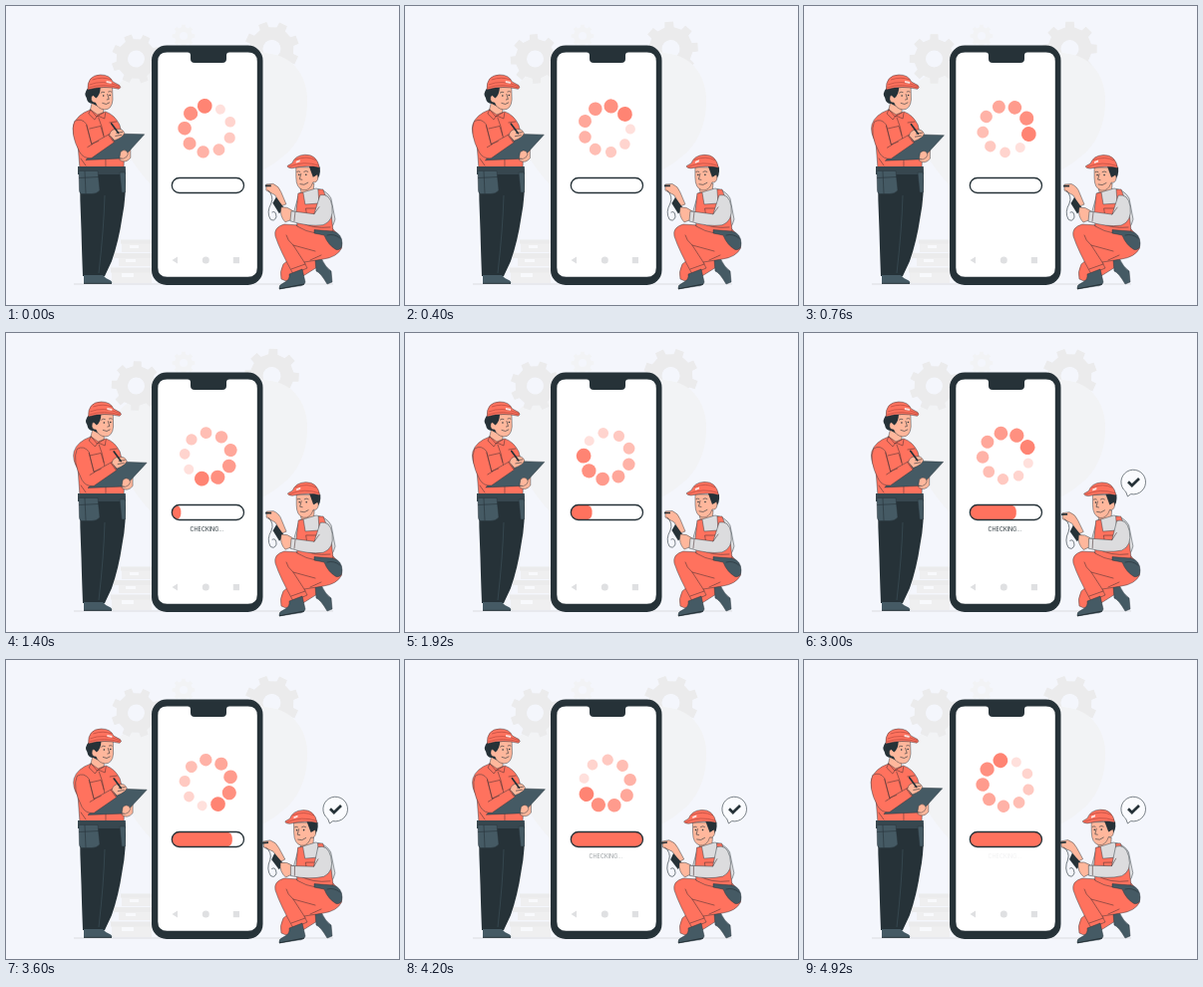
An HTML page for the animation above (4.96 s loop, 394 by 300 pixels).

```html
<!DOCTYPE html>
<html lang="en">
<head>
<meta charset="utf-8">
<title>Checking</title>
<style>
  html, body { margin: 0; width: 100%; height: 100%; overflow: hidden; background: #f4f6fc; }
  svg { display: block; width: 100%; height: 100%; }
  .coral { fill: #ff725e; }
  .dark { fill: #263238; }
  .slate { fill: #455a64; }
  .skin { fill: #ffb79c; }
  .shirt { fill: #dcdcde; }
  .pale { fill: #ebebec; }
  .blob { fill: #f2f3f5; }
  .edge { stroke: #263238; stroke-width: .45; stroke-linejoin: round; }
  .line { fill: none; stroke: #263238; stroke-width: .6; stroke-linecap: round; stroke-linejoin: round; }
  .fold { fill: none; stroke: #4a3334; stroke-width: .55; stroke-linecap: round; }
  .stripe { fill: none; stroke: #a9443a; stroke-width: .6; }
</style>
</head>
<body>
<svg viewBox="0 0 394 300">
  <rect width="394" height="300" fill="#f4f6fc"/>

  <g id="back">
    <path id="gearR" class="pale"/>
    <path id="gearS" class="blob" fill-rule="evenodd"/>
    <path class="blob" d="M105 98C105 76 130 66 150 52C180 38 240 42 265 48C290 51 304 74 302 99C301 124 290 143 275 153C250 175 190 190 150 184C128 162 106 128 105 98Z"/>
    <path id="gearL" class="pale" fill-rule="evenodd"/>
    <g fill="#efeff0">
      <rect x="116" y="235" width="30" height="12"/>
      <rect x="113" y="249" width="33" height="12"/>
      <rect x="106" y="264" width="40" height="14"/>
    </g>
    <path class="pale" d="M115 234.500h31v4h-31zM108 248h38v5h-38zM105 262.500h41v5h-41z"/>
    <path fill="#f8f9fc" d="M124 240h9v3h-9zM120 254h10v3h-10zM116 268h12v4h-12z"/>
    <path d="M68 279H328" stroke="#d0d2d5" stroke-width=".7"/>
  </g>

  <g id="phone">
    <rect class="dark" x="146" y="39.500" width="111.500" height="240.500" rx="15"/>
    <path fill="#fff" d="M161.500 46.500H182Q185 46.500 185 49.500V53Q185 57 189 57H217Q221 57 221 53V49.500Q221 46.500 224 46.500H242.500Q251.800 46.500 251.800 55.500V262.500Q251.800 271.800 242.500 271.800H161.500Q152.300 271.800 152.300 262.500V55.500Q152.300 46.500 161.500 46.500Z"/>
    <g fill="#dfe0e2">
      <path d="M166.500 255L172 251.500V258.500Z"/>
      <circle cx="200.300" cy="255" r="3.500"/>
      <rect x="227.800" y="252" width="6.200" height="6.200"/>
    </g>
    <g id="ring"></g>
    <clipPath id="barClip"><rect x="166.300" y="172.500" width="72.200" height="15" rx="7.500"/></clipPath>
    <g clip-path="url(#barClip)"><rect id="fill" class="coral" x="166" y="172.500" width="72.500" height="15" rx="6"/></g>
    <rect x="166.300" y="172.500" width="72.200" height="15" rx="7.500" fill="none" stroke="#263238" stroke-width="1.300"/>
    <text id="label" x="201.300" y="199" text-anchor="middle" font-family="Inter, sans-serif" font-size="5.500" fill="#263238">CHECKING...</text>
  </g>

  <g id="standing">
    <path class="dark" d="M74 163H119.500Q121 190 116.500 212Q113 236 106 256L99 271H77Q76 245 75.500 225Q74 195 74 163Z"/>
    <path fill="none" stroke="#455a64" stroke-width=".5" d="M99 190Q98 225 93 268"/>
    <path class="slate" d="M78 270H97Q100 274 105 275.500Q107 277 106 278.500H78Z"/>
    <path d="M78 278.300H106" stroke="#263238" stroke-width="1"/>
    <g id="torso">
      <path class="skin edge" d="M87 95L98 99V109L91 111L84 107Z"/>
      <path class="coral edge" d="M85 104L92 109L100 106Q109 109 114 119L119 139L118 163H74L72 137Q66 127 68 119Q71 109 85 104Z"/>
      <path class="fold" d="M85 104L91 111L98 107M85 104L83 108L89 114L92 110L99 113L100 107M93 112Q101 130 100 161M84 123L95 120.500L98 130M104 117L111 116M75 153L80 160"/>
      <path class="dark" d="M72 161H119.800V169H72Z" style="fill:#37474f"/>
      <g id="head">
        <path class="dark" d="M82 83Q78 88 81 92Q82 98 87 98L93 101L92 82Z"/>
        <path class="skin edge" d="M90 82L107 81L107.300 94Q106.500 104 99 104Q92 103 90 97Q85 97 86 91Q88 88 90 91Z"/>
        <path class="dark" d="M86 82H95Q95 89 90.500 92.500L87 89Z"/>
        <path class="line" d="M95.500 87Q97 85.500 99 86.500M103 86Q105 85 106 86M102 88.500L103.500 93.500L101.500 94M97 97.500Q101 100 104 97"/>
        <circle class="dark" cx="98" cy="90" r=".8"/><circle class="dark" cx="104.500" cy="89.500" r=".8"/>
        <path class="coral edge" d="M82.300 84Q81.500 69.500 95 69Q104.500 69 107.500 76L114 79.500Q116.500 82 113.500 83.300Q98 79.500 82.300 84Z"/>
        <path class="stripe" d="M84 79Q97 73.500 114 80.500M87 74Q97 70.500 106 74M83 82Q98 77 114 82"/>
        <path fill="#fff" opacity=".8" d="M101 75L106 76V78L101 77Z"/>
      </g>
      <g id="arms">
        <path class="skin edge" d="M116 144Q122 138 126 143L126 153Q121 159 115 155Z"/>
        <path class="slate edge" d="M109 128.500L140 129.500L118 153.500L81 155Z"/>
        <path class="skin edge" d="M116 147Q119 144 122 146Q125 149 122 152Q119 155 115 153Z"/>
        <path class="coral edge" d="M70 116Q77 112 82 119L87 139L105 129L110 137L87 153Q79 154 75 147Q65 128 70 116Z"/>
        <path class="fold" d="M82 120L87 139L94 136M83 142L88 139M104 130L109 137"/>
        <path class="skin edge" d="M105 130Q106 124 112 124Q118 123 120 128Q119 132 110 135.500Z"/>
        <path d="M107 118.500L114 128" stroke="#263238" stroke-width="1.700" stroke-linecap="round"/>
        <path class="line" d="M112 128L118 127M111 131L117 130"/>
      </g>
    </g>
    <path class="slate edge" d="M73 165.500H92L94 185Q91 188.500 86 188.500H76Q73.500 188 73.500 185Z"/>
    <path class="line" d="M73.500 172.500L93 171.500M79 166L80 188"/>
    <path class="slate edge" d="M114 167H119.500V187H116Z"/>
  </g>

  <g id="kneeling">
    <path class="coral edge" d="M289 250L278 259Q274 267 276 274Q283 278 293 274L312 262L314 252Z"/>
    <path class="slate edge" d="M310 255L316 253Q320 262 326 266L327 277L322 279Q315 267 311 266Z"/>
    <path class="coral edge" d="M279 219L326 222Q337 232 336.500 243Q332 252 318 254L299 257L302 263L288 269Q275 246 270 231Q268 222 279 219Z"/>
    <path class="fold" d="M299 257L288 240Q282 235 281 230M288 240L310 246M286 264L300 259M291 220Q302 226 316 226M305 255L316 250"/>
    <path class="slate edge" d="M284 269L297 264L300 277Q299 281 293 281L274 284Q273 280 278 278Q285 275 284 269Z"/>
    <path d="M274 283.800L299 279" stroke="#263238" stroke-width="1"/>
    <g id="lean">
      <path class="skin edge" d="M294 176L309 178L308 190L297 192Z"/>
      <path class="shirt edge" d="M294 188L311 183Q322 185 326 193L330 214Q328 226 315 225L297 221L288 209Z"/>
      <path class="coral edge" d="M293 188L298 187L300 199L314 198L313 184L318 184Q321 194 325 199L328 226Q310 232 292 221L291 207Z"/>
      <path class="fold" d="M301 203H312V210H302ZM294 216Q307 224 325 222"/>
      <g id="face">
        <path class="dark" d="M307 160L315 162Q316 171 311 175L305 171Z"/>
        <path class="skin edge" d="M291 162L308 162L309 171Q313 167 313 173Q312 178 308 177Q305 186 298 185Q291 183 291 172Z"/>
        <path class="dark" d="M304 161L313 161L311.500 170L308 172Z"/>
        <path class="line" d="M292 166.500Q294 165.500 295 166.500M299 166.500Q301 165 303 166.500M296 168.500L294.500 174L297 174.500M295 179Q299 181 303 177.500"/>
        <circle class="dark" cx="294" cy="169.500" r=".8"/><circle class="dark" cx="301" cy="169.500" r=".8"/>
        <path class="coral edge" d="M287 158Q290 150 300 149.500Q312 149 314.500 162.500Q303 159.500 287 163Q281.500 162.500 282.500 160.500Z"/>
        <path class="stripe" d="M284 161.500Q299 155 314 160.500M290 154.500Q302 150 311 155"/>
        <path fill="#fff" opacity=".8" d="M291 156L295 154.500V156.500L291 158Z"/>
      </g>
      <g id="reach">
        <path class="skin edge" d="M261 179L268 178.500Q274 181 276 187L281 199L276 201L270 190L261 185Z"/>
        <path d="M260 180.500L266 180.500" stroke="#263238" stroke-width="1.700"/>
        <path class="line" d="M263 185Q269 191 266 198Q261 207 265 214Q269 217 271 212Q271 205 267 207"/>
        <path class="dark" d="M271 192L279 203L274 208.500L267.500 198Z"/>
        <path class="skin edge" d="M276 202Q282 201 288 206L288 214L280 217Q274 211 276 202Z"/>
        <path class="shirt edge" d="M315 190Q325 188 327 201Q329 216 318 220Q303 222 285 216L286 206L309 209Z"/>
        <path class="fold" d="M309 209L314 202M290 207L289 216"/>
      </g>
    </g>
    <path class="slate edge" d="M309 224.500L328 226Q336.500 228 337 238Q337 245.500 331 244.500Q323 240 319 230L309 228Z"/>
    <path class="line" d="M322 230Q329 228 335 233"/>
  </g>

  <g id="bubble">
    <path d="M322.700 159.300A12.300 12.300 0 1 1 327.700 161.600L324.500 164Z" fill="#fafbfe" stroke="#263238" stroke-width=".6"/>
    <path id="mark" d="M325 149.300L328.800 153L336 146" fill="none" stroke="#263238" stroke-width="2.700"/>
  </g>
</svg>
<script>
const LOOP = 4960, TAU = Math.PI * 2, DOTS = 9;
const $ = id => document.getElementById(id);
const put = (id, value) => $(id).setAttribute('transform', value);
const fade = (id, value) => $(id).setAttribute('opacity', value);
const ramp = (t, a, b) => Math.min(1, Math.max(0, (t - a) / (b - a)));
const ease = (t, a, b) => { const p = ramp(t, a, b); return p * p * (3 - 2 * p); };

function gearPath(cx, cy, outer, inner, hole) {
  const pts = [];
  for (let i = 0; i < 8; i++) {
    for (const [step, r] of [[-.27, inner], [-.2, outer], [.2, outer], [.27, inner]]) {
      const a = (i + step) / 8 * TAU;
      pts.push((cx + r * Math.cos(a)).toFixed(2) + ' ' + (cy + r * Math.sin(a)).toFixed(2));
    }
  }
  const ring = `M${cx - hole} ${cy}a${hole} ${hole} 0 1 0 ${hole * 2} 0a${hole} ${hole} 0 1 0 ${-hole * 2} 0Z`;
  return 'M' + pts.join('L') + 'Z' + ring;
}

$('gearL').setAttribute('d', gearPath(130.5, 53, 25, 20, 8.5));
$('gearR').setAttribute('d', gearPath(266.5, 43, 27.5, 22, 9));
$('gearS').setAttribute('d', gearPath(178, 30, 11.5, 9, 4));

// Sizes and opacities fall away behind the leading dot.
for (let i = 0; i < DOTS; i++) {
  const dot = document.createElementNS('http://www.w3.org/2000/svg', 'circle');
  const k = i / (DOTS - 1), a = -i * TAU / DOTS;
  dot.setAttribute('cx', 23.4 * Math.cos(a));
  dot.setAttribute('cy', 23.4 * Math.sin(a));
  dot.setAttribute('r', 7.4 - 2.4 * k);
  dot.setAttribute('fill', '#ff725e');
  dot.setAttribute('opacity', .87 - .65 * k);
  $('ring').append(dot);
}

function draw(t) {
  put('ring', `translate(202.5 123.5) rotate(${-98 + 720 * t / LOOP})`);
  const filled = ramp(t, 1000, 4100);
  put('fill', `translate(${-72.5 * (1 - filled)} 0)`);
  fade('fill', filled > 0 ? 1 : 0);

  const blink = t % (LOOP / 3);
  fade('label', ease(blink, 780, 1010) * (1 - ease(blink, 1420, 1650)));

  const turn = -20 + 20 * ease(t, 0, 560) + 25 * ease(t, 1160, 2240);
  put('gearL', `rotate(${turn} 130.5 53)`);
  put('gearR', `rotate(${turn} 266.5 43)`);

  const sway = -Math.cos(TAU * t / (LOOP / 2));
  put('torso', `rotate(${.25 * sway} 97 165)`);
  put('arms', `translate(${1.1 * sway} ${.5 * sway})`);

  const bend = ease(t, 2500, 3400);
  put('lean', `rotate(${-.8 * bend + .2 * sway} 312 226)`);
  put('face', `translate(${-1.8 * bend} ${.7 * bend + .3 * sway})`);
  put('reach', `translate(0 ${.3 * sway}) rotate(${-5 * bend} 285 210)`);

  const pop = ease(t, 2200, 2850), size = .5 + .5 * pop;
  put('bubble', `translate(328 166) scale(${size}) translate(-328 -166)`);
  fade('bubble', pop);
  fade('mark', pop);
}

let start;
function tick(now) {
  start ??= now;
  draw((now - start) % LOOP);
  requestAnimationFrame(tick);
}
draw(0);
requestAnimationFrame(tick);
</script>
</body>
</html>
```
